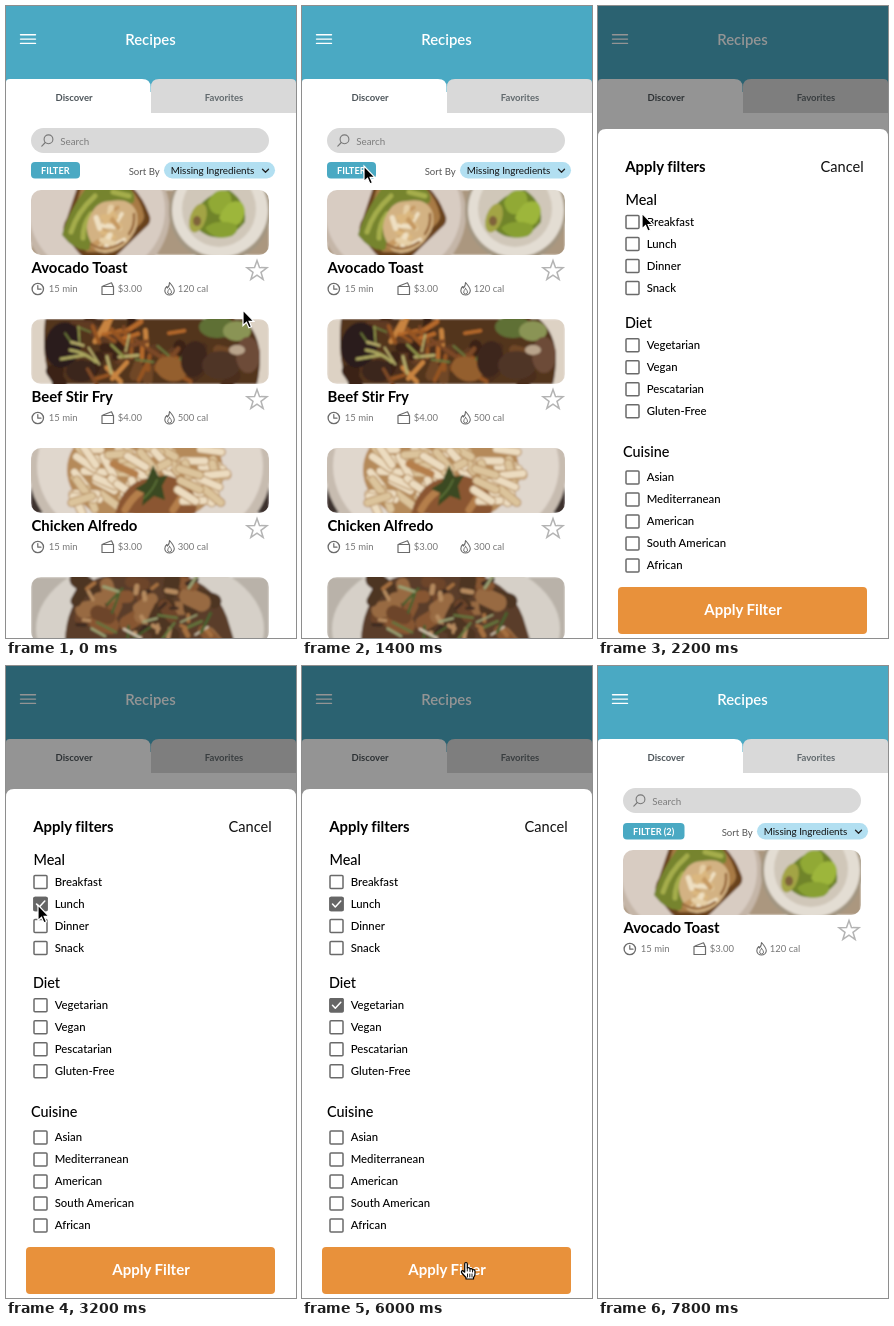
Animation of 290 by 632 pixels, one loop 7900 ms. Source, as an HTML page:

```html
<!DOCTYPE html>
<html lang="en">
<head>
<meta charset="utf-8">
<title>Recipe filter</title>
<style>
html, body { margin: 0; width: 100%; height: 100%; overflow: hidden; background: #fff; }
svg { display: block; }
text { font-family: Lato, "Open Sans", sans-serif; font-variant-ligatures: none; white-space: pre; }
</style>
</head>
<body>
<svg id="stage" width="290" height="632" viewBox="0 0 290 632"></svg>
<script>
const LOOP = 7900, W = 290, H = 632;
const TEAL = '#4aa9c3', GREY = '#d9d9d9', INK = '#6b6b6b';

// ---------- drawing helpers ----------
const rect = (x, y, w, h, fill, r = 0, more = '') =>
  `<rect x="${x}" y="${y}" width="${w}" height="${h}" rx="${r}" fill="${fill}" ${more}/>`;
const oval = (x, y, rx, ry, fill, turn = 0) =>
  `<ellipse cx="${x}" cy="${y}" rx="${rx}" ry="${ry}" fill="${fill}" transform="rotate(${turn} ${x} ${y})"/>`;
const shape = (d, fill) => `<path d="${d}" fill="${fill}"/>`;
const line = (d, color, w = 1.2) =>
  `<path d="${d}" fill="none" stroke="${color}" stroke-width="${w}" stroke-linecap="round" stroke-linejoin="round"/>`;
const text = (s, x, y, size, fill = '#000', weight = 400, more = '') =>
  `<text x="${x}" y="${y}" font-size="${size}" fill="${fill}" font-weight="${weight}" ${more}>${s}</text>`;
const group = (body, x, y, more = '') => `<g transform="translate(${x} ${y})" ${more}>${body}</g>`;

// seeded generator: rnd(a, b) gives a number between a and b
function random(seed) {
  return (a, b) => {
    seed = (seed + 0x6d2b79f5) | 0;
    let n = Math.imul(seed ^ (seed >>> 15), seed | 1);
    n ^= n + Math.imul(n ^ (n >>> 7), n | 61);
    return a + (b - a) * ((n ^ (n >>> 14)) >>> 0) / 4294967296;
  };
}

// short strokes scattered inside a box
function strips(rnd, n, [x0, y0, x1, y1], len, width, colors) {
  let out = '';
  for (let i = 0; i < n; i++) {
    const a = rnd(0, Math.PI), l = rnd(len * 0.6, len);
    const dx = Math.cos(a) * l, dy = Math.sin(a) * l;
    const x = rnd(x0, x1) - dx / 2, y = rnd(y0, y1) - dy / 2;
    const color = colors[Math.floor(rnd(0, colors.length))];
    out += line(`M${x.toFixed(1)} ${y.toFixed(1)}l${dx.toFixed(1)} ${dy.toFixed(1)}`,
      color, rnd(width * 0.6, width).toFixed(1));
  }
  return out;
}

// ---------- food pictures, 238 x 65 each ----------
function toast() {
  const rnd = random(8);
  return rect(0, 0, 238, 65, '#ab977f')
    + oval(66, 24, 73, 70, '#c5b6a8') + oval(66, 20, 68, 66, '#d8ccc2')
    + shape('M46 -2H102Q112 8 118 24Q122 32 114 38L84 67H52Q44 60 34 44Q30 38 36 28Z', '#69421f')
    + shape('M50 -2H99Q110 10 113 25Q114 31 106 37L82 62H56Q42 50 39 38Z', '#a87a45')
    + shape('M31 45Q36 24 55 -2H98Q105 4 103 12L66 32L58 60Q44 62 31 45Z', '#76842f')
    + line('M40 42Q46 22 64 6M52 48Q52 34 60 24M82 2L98 6', '#a5ad4b', 5)
    + shape('M60 24Q66 11 80 11Q101 7 106 24Q108 37 101 46Q94 58 80 62Q64 66 60 52Q52 38 60 24Z', '#d3b283')
    + strips(rnd, 18, [66, 18, 99, 54], 14, 6, ['#e6cfa6', '#efe0c2', '#c69a62', '#dbb77f'])
    + line('M60 54Q74 64 92 52M103 24Q104 36 98 44', '#96683a', 2.5)
    + oval(189, 21, 51, 51, '#a39682') + oval(189, 20, 48, 47, '#e3ddd3') + oval(188, 19, 37, 38, '#d0c7b9')
    + shape('M162 24Q176 2 198 0Q216 12 214 32Q198 52 178 46Q162 40 162 24Z', '#70842a')
    + oval(167, 28, 8, 15, '#a3a444', 18) + oval(166, 31, 4, 5, '#80633a')
    + shape('M177 12Q184 -4 198 2Q204 12 196 23Q180 29 177 12Z', '#91a936')
    + shape('M188 28Q196 8 210 12Q218 20 209 33Q196 42 188 28Z', '#9db63b')
    + shape('M174 38Q185 28 204 34Q210 40 201 46Q184 52 174 38Z', '#88a030');
}

function stirFry() {
  const rnd = random(77);
  return rect(0, 0, 238, 65, '#ddd2c4')
    + shape('M14 0H212Q236 20 226 65H22Q10 45 14 0Z', '#52351f')
    + strips(rnd, 30, [24, 4, 205, 62], 18, 13, ['#3a2418', '#5f3a22', '#6f4626', '#4c2f1e'])
    + oval(32, 26, 18, 23, '#2b1c1a', 12) + oval(50, 52, 15, 11, '#3a251c')
    + strips(rnd, 30, [58, 2, 152, 62], 22, 5, ['#b5692c', '#c98440', '#965522', '#7d4825'])
    + strips(rnd, 12, [30, 6, 170, 56], 20, 3, ['#8d9249', '#b5ab6a', '#69753a'])
    + oval(140, 50, 16, 12, '#945f2e', 20)
    + oval(163, 40, 13, 18, '#3c251d', 10) + oval(190, 46, 19, 14, '#503428')
    + oval(186, 8, 18, 11, '#5f6f35') + oval(206, 12, 14, 10, '#8a9455')
    + oval(217, 36, 12, 18, '#6d4b38') + oval(206, 31, 8, 5, '#b9a48c')
    + line('M39 31Q53 33 65 43M30 40L54 36', '#aaa65f', 3);
}

function alfredo() {
  const rnd = random(412);
  const pasta = (n, x0, y0, x1, y1) => {
    let out = '';
    for (let i = 0; i < n; i++) {
      const a = rnd(-0.5, 1.4), x = rnd(x0, x1) - 10 * Math.cos(a), y = rnd(y0, y1) - 10 * Math.sin(a);
      const d = `M${x.toFixed(1)} ${y.toFixed(1)}l${(Math.cos(a) * 21).toFixed(1)} ${(Math.sin(a) * 21).toFixed(1)}`;
      out += line(d, '#b48c5e', 9) + line(d, i % 3 ? '#ecdcc0' : '#dcc49c', 7);
    }
    return out;
  };
  return rect(0, 0, 238, 65, '#3c332f')
    + oval(119, 22, 121, 92, '#c7bcb0') + oval(119, 18, 113, 86, '#e0d7cd')
    + oval(114, 22, 78, 56, '#b58a5a')
    + pasta(70, 46, 0, 186, 58)
    + shape('M84 66Q92 34 118 30Q140 22 156 38Q170 50 164 66Z', '#8b5630')
    + line('M94 62Q104 44 120 38M142 62L154 44M82 16L104 26', '#b57f4c', 7)
    + pasta(5, 150, 22, 180, 60)
    + shape('M122 17L128 29L137 27L131 38L134 52L123 48L111 58L113 45L104 41L115 34Z', '#3a4a22')
    + line('M113 50Q122 42 126 32', '#5c6f38', 2);
}

function braised() {
  const rnd = random(951);
  return rect(0, 0, 238, 65, '#b9b2a9')
    + oval(119, 52, 114, 74, '#d6d0c8')
    + shape('M34 66Q34 30 58 6Q70 -4 96 -2H150Q184 8 196 40L204 66Z', '#5a3d29')
    + strips(rnd, 30, [48, 4, 186, 64], 18, 18, ['#6d4529', '#875733', '#4d3424', '#986a42'])
    + strips(rnd, 22, [46, 4, 184, 62], 10, 5, ['#b58a5e', '#3c2a20', '#a5703f'])
    + strips(rnd, 16, [56, 4, 180, 60], 22, 3, ['#64753d', '#9aa274', '#49602f', '#cfc5b0']);
}

const DISHES = [
  ['Avocado Toast', '$3.00', '120 cal', toast],
  ['Beef Stir Fry', '$4.00', '500 cal', stirFry],
  ['Chicken Alfredo', '$3.00', '300 cal', alfredo],
  ['Braised Beef', '$4.00', '400 cal', braised],
];

// ---------- screens ----------
function star(x, y, r) {
  let pts = '';
  for (let i = 0; i < 10; i++) {
    const a = Math.PI * (i / 5 - 0.5), k = i % 2 ? r * 0.4 : r;
    pts += `${(x + k * Math.cos(a)).toFixed(2)},${(y + k * Math.sin(a)).toFixed(2)} `;
  }
  return `<polygon points="${pts}" fill="none" stroke="#b4b4b4" stroke-width="1.5"/>`;
}

function card([name, price, cal, picture], i) {
  const y = 184 + i * 129, small = (s, x) => text(s, x, 102, 9.5, '#777');
  return group(
    group(`<g filter="url(#soft)">${picture()}</g>`, 25, 0, 'clip-path="url(#photo)"')
    + text(name, 25.5, 83, 14.9, '#000', 700) + star(251, 81, 10.5)
    + `<circle cx="31.8" cy="99" r="5.7" fill="none" stroke="${INK}" stroke-width="1.3"/>`
    + line('M31.8 95.5V99.2H35', INK) + small('15 min', 42.7)
    + line('M96 96.5H107.5V104.5H96ZM97 96L105.5 92.8L107 96', INK) + small(price, 111.7)
    + line('M163.5 92.5Q168.5 98 168.3 101Q167.5 105 163.5 105Q159.5 105 158.8 101Q158.8 98 160.8 96.5L161.5 98Q163.6 96 163.5 92.5Z', INK, 1.1)
    + line('M163.6 98.5Q166 101 165.5 103Q163.6 105 161.7 103Q161.2 101 163.6 98.5Z', INK, 0.9)
    + small(cal, 171.8), 0, y);
}

function header() {
  const mid = 'text-anchor="middle"';
  return rect(0, 80, W, H - 80, '#fff') + rect(0, -4, W, 90, TEAL)
    + shape('M0 107V76Q0 73 4 73H136Q144.5 73 144.5 81V107Z', '#fff')
    + shape('M145 107V81Q145 73 153 73H285Q290 73 290 77V107Z', GREY)
    + line('M14.5 28.8H29.5M14.5 33.1H29.5M14.5 37.4H29.5', '#fff', 1.4)
    + text('Recipes', 144.5, 38.5, 14.9, '#fff', 600, mid)
    + text('Discover', 68, 94.5, 9.5, '#4d555a', 700, mid)
    + text('Favorites', 218, 94.5, 9.5, '#626a6e', 700, mid);
}

function page(filtered) {
  const s = filtered ? 1 : 0;
  return header()
    + rect(25, 122, 238, 25, GREY, 12.5)
    + '<circle cx="42.5" cy="133.3" r="4.4" fill="none" stroke="#777" stroke-width="1.1"/>'
    + line('M39.3 136.5L35.8 140.2', '#777', 1.1) + text('Search', 54.3, 138.8, 9.8, '#7c7c7c')
    + rect(25, 156 + s, filtered ? 61.5 : 49, 16.5, TEAL, 4)
    + text(filtered ? 'FILTER (2)' : 'FILTER', 35, 168 + s, 9.2, '#fff', 700)
    + text('Sort By', 122.7 + s, 168.5 + s, 9.6, '#555')
    + rect(158 + s, 156 + s, 111, 16.5, '#b2dff1', 8.2)
    + text('Missing Ingredients', 164.7 + s, 168 + s, 9.85, '#111')
    + line(`M${256.5 + s} ${163.2 + s}l3 3l3 -3`, '#222', 1.3)
    + DISHES.slice(0, filtered ? 1 : 4).map(card).join('');
}

const FILTERS = [
  ['Meal', 27.5, 199, 216, ['Breakfast', 'Lunch', 'Dinner', 'Snack']],
  ['Diet', 27, 322, 339.3, ['Vegetarian', 'Vegan', 'Pescatarian', 'Gluten-Free']],
  ['Cuisine', 25, 451, 471.5, ['Asian', 'Mediterranean', 'American', 'South American', 'African']],
];

function sheet() {
  let out = header() + rect(0, -4, W, H, '#000', 0, 'id="dim"')
    + shape(`M0 ${H}V131Q0 123 8 123H282Q290 123 290 131V${H}Z`, '#fff')
    + text('Apply filters', 27.3, 166, 14.9, '#000', 700)
    + text('Cancel', 222.5, 166, 14.6, '#111');
  for (const [title, x, base, top, names] of FILTERS) {
    out += text(title, x, base, 14.4, '#000', 500);
    names.forEach((name, i) => {
      const y = top + i * 22;
      out += rect(28, y - 6.5, 13, 13, '#fff', 1, 'stroke="#6a6a6a" stroke-width="1.5"')
        + `<g id="${name.replace(' ', '')}" display="none">` + rect(27.3, y - 7.2, 14.4, 14.4, '#666', 1.5)
        + line(`M30.5 ${y}l2.8 3l5.5 -6`, '#fff', 1.5) + '</g>'
        + text(name, 48.7, y + 3.8, 11.35, '#000', 500);
    });
  }
  return out + rect(20, 581, 249, 47, '#e8913b', 4)
    + text('Apply Filter', 145, 609.3, 15, '#fff', 700, 'text-anchor="middle"');
}

const ARROW = 'M0 0V15.5L3.5 12.2L5.9 17.8L8.5 16.7L6.1 11.3H10.9Z';
const HAND = 'M-1.3 1Q-1.3 -.5 0 -.5Q1.3 -.5 1.3 1V5Q3.5 4 4 6Q6 5 6.5 7Q9 6 9 8.5V11Q9 13 7.5 14.5V16H0V14.5Q-2 12.5 -4.5 9.5Q-5 7.5 -3 7.7L-1.3 9.2Z';

const $ = id => document.getElementById(id);
$('stage').innerHTML =
  `<defs><clipPath id="photo"><rect width="238" height="65" rx="10"/></clipPath>
  <filter id="soft" x="0" y="0" width="1" height="1"><feGaussianBlur stdDeviation=".9"/></filter></defs>
  <g id="list">${page(false)}</g>
  <rect id="shade" width="${W}" height="${H}"/>
  <g id="sheet">${sheet()}</g>
  <g id="result">${page(true)}</g>
  <g id="pointer">
    <path id="arrow" d="${ARROW}" stroke="#fff" stroke-width="1.2"/>
    <g id="hand"><path d="${HAND}" fill="#fff" stroke="#000" stroke-width="1.2" stroke-linejoin="round"/>
    ${line('M1.3 5V8M4 6.5V8.5M6.5 7.5V9M1.5 11V14M3.8 11V14M6 11V14', '#000', 0.9)}</g>
  </g>`;

// ---------- motion ----------
const PATH = [ // time, x, y
  [250, 237, 304], [1250, 62, 160], [1750, 62, 160], [2550, 32, 239], [3350, 32, 239],
  [4100, 32, 339], [4500, 32, 339], [5750, 164, 597], [6750, 164, 597], [6900, 162.5, 591],
];
const SLIDE = 1406, FADE = 6380, SPAN = 300;

const clamp = v => Math.min(1, Math.max(0, v));
const smooth = k => (1 - Math.cos(Math.PI * k)) / 2;

// cubic-bezier(0, 0, .58, 1)
function easeOut(x) {
  if (x <= 0 || x >= 1) return clamp(x);
  let lo = 0, hi = 1, u = x;
  for (let i = 0; i < 20; i++) {
    u = (lo + hi) / 2;
    if (1.74 * u * u * (1 - u) + u ** 3 < x) lo = u; else hi = u;
  }
  return 3 * u * u * (1 - u) + u ** 3;
}

function pointerAt(t) {
  if (t <= PATH[0][0]) return PATH[0].slice(1);
  for (let i = 1; i < PATH.length; i++) {
    const a = PATH[i - 1], b = PATH[i];
    if (t < b[0]) {
      const k = smooth((t - a[0]) / (b[0] - a[0]));
      return [a[1] + (b[1] - a[1]) * k, a[2] + (b[2] - a[2]) * k];
    }
  }
  return PATH[PATH.length - 1].slice(1);
}

const show = (id, on) => $(id).setAttribute('display', on ? 'inline' : 'none');
const move = (id, x, y) => $(id).setAttribute('transform', `translate(${x.toFixed(2)} ${y.toFixed(2)})`);
const fadeTo = (id, k) => $(id).setAttribute('opacity', k.toFixed(3));

function draw(t) {
  const up = easeOut((t - SLIDE) / SPAN);
  move('list', 0, -H * 0.25 * up);
  move('sheet', 0, H * (1 - up));
  fadeTo('shade', 0.54 * up);
  fadeTo('dim', 0.53 - 0.11 * smooth(clamp((t - SLIDE - 200) / SPAN)));
  fadeTo('result', easeOut((t - FADE) / SPAN));
  show('sheet', up > 0);
  show('Lunch', t >= 2800);
  show('Vegetarian', t >= 4300);

  const [x, y] = pointerAt(t);
  const hand = y >= 581 && t < 6750;
  move('pointer', x, y);
  show('pointer', t < 7350);
  show('hand', hand);
  show('arrow', !hand);
}

const start = performance.now();
function tick() {
  draw((performance.now() - start) % LOOP);
  requestAnimationFrame(tick);
}
tick();
</script>
</body>
</html>
```
